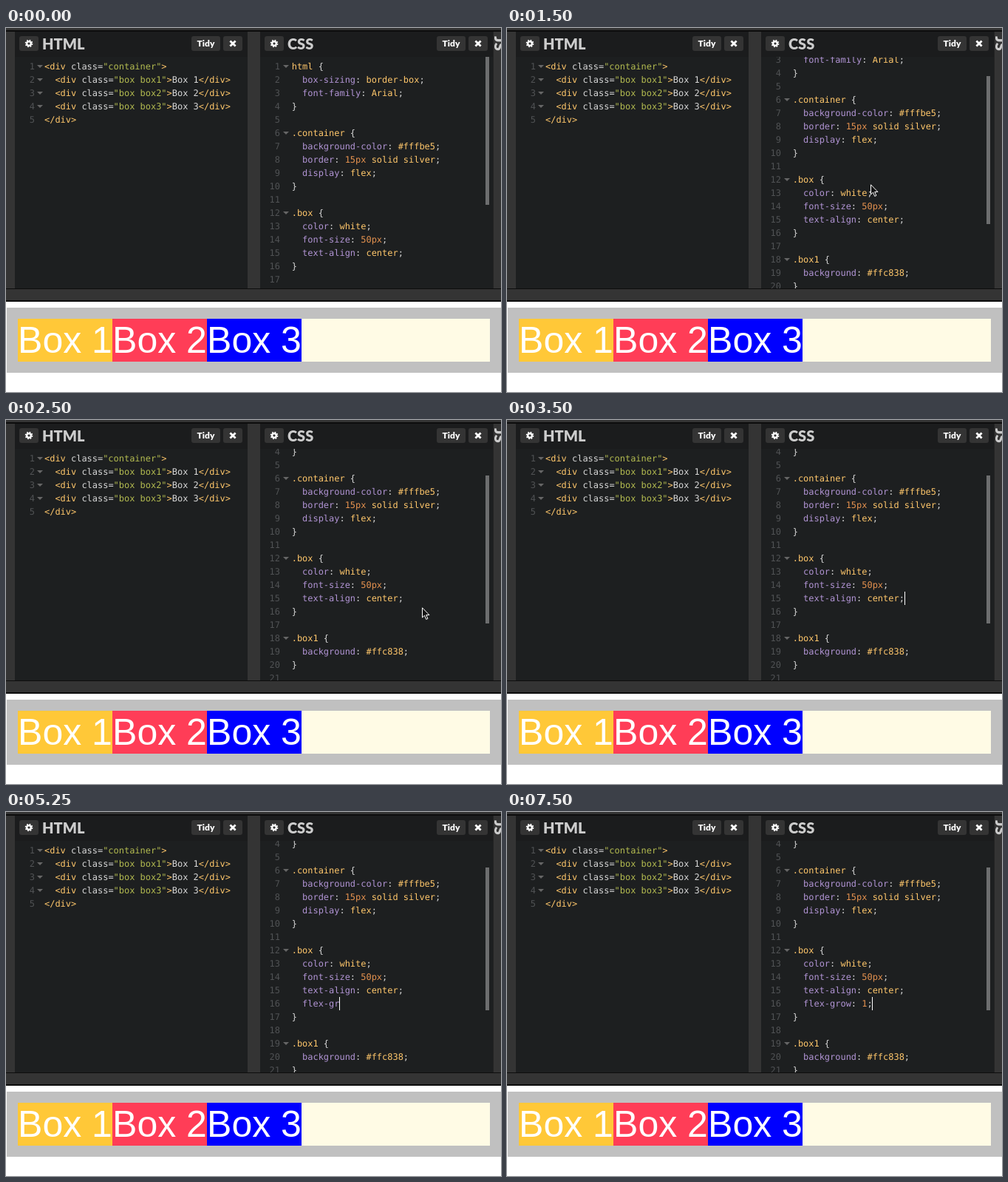
Animation of 670x492 px, one loop 8000 ms. Source, as an HTML page:

```html
<!DOCTYPE html>
<html lang="en">
<head>
<meta charset="utf-8">
<title>Flexbox editor</title>
<style>
  html, body { margin: 0; width: 100%; height: 100%; overflow: hidden; background: #fff; }
  #stage { position: relative; width: 670px; height: 492px; overflow: hidden; background: #fff; }
  #stage div, #stage svg { position: absolute; box-sizing: border-box; }
  #top { width: 670px; height: 370px; background: #343434; overflow: hidden; }
  #rule { top: 3px; width: 670px; height: 2px; background: #0d0d0d; }
  #sash { top: 352px; width: 670px; height: 18px; background: #343434;
    border-top: 1px solid #0d0d0d; border-bottom: 2px solid #0d0d0d; }
  .panel { top: 5px; width: 315px; height: 348px; background: #1d1f20; }
  .bar { width: 315px; height: 34px; background: #1b1c1d; }
  .btn { top: 6px; height: 20px; border-radius: 3px; background: #343434; color: #fff;
    font: 900 12px/20px Lato, sans-serif; text-align: center; }
  .btn svg { left: 50%; top: 50%; margin: -8px; width: 16px; height: 16px; fill: none; stroke: #fff; }
  .title { color: #ccc; font: 900 20px/24px Lato, sans-serif; white-space: pre; }
  .bar .title { left: 37px; top: 4px; }
  #next { left: 659px; top: 5px; width: 11px; height: 347px; border-left: 1px solid #222; overflow: hidden; }
  #next .title { left: 21px; top: 6px; transform-origin: 0 0; transform: rotate(90deg); }
  .view { top: 34px; width: 315px; height: 314px; overflow: hidden; }
  .lines { top: 4px; width: 315px; }
  .row { width: 315px; height: 18px; white-space: pre; color: #d8d8d8;
    font: 11.96px/18px "DejaVu Sans Mono", monospace; text-rendering: geometricPrecision; }
  .num { width: 27px; text-align: right; color: #505254; }
  .num.wide { left: 0; }
  .fold { top: 7px; border: 4px solid transparent; border-top-color: #666; border-bottom: 0; }
  .key { color: #ffc76b; }
  .prop { color: #b194d4; }
  .val { color: #e5924f; }
  .str { color: #b3bb50; }
  #thumb { left: 305px; width: 5px; background: #6d6e6f; }
  #caret { width: 1px; height: 18px; background: #fff; }
  #box { left: 1px; top: 378px; width: 669px; height: 88px; background: #fffbe5; border: 15px solid silver; }
  #box div { top: 0; width: 128px; height: 58px; color: #fff; text-align: center; white-space: pre;
    font: 50px/58px "Liberation Sans", Arial, sans-serif; }
  #mouse { width: 13px; height: 19px; overflow: visible; }
</style>
</head>
<body>
<div id="stage"></div>
<script>
const markup = `<div class="container">
  <div class="box box1">Box 1</div>
  <div class="box box2">Box 2</div>
  <div class="box box3">Box 3</div>
</div>`.split("\n");

const styles = `html {
  box-sizing: border-box;
  font-family: Arial;
}

.container {
  background-color: #fffbe5;
  border: 15px solid silver;
  display: flex;
}

.box {
  color: white;
  font-size: 50px;
  text-align: center;
}

.box1 {
  background: #ffc838;
}

.box2 {`.split("\n");

const GAP = 15;      // index of the line being typed
const PITCH = 7.2;   // width of one character
const LOOP = 8000;

// time, scroll, mouse position or null, typed text or null, caret shown
const steps = [
  [0, 0, null, null, false],
  [500, 0, [519, 209], null, false],
  [750, 0, [492, 211], null, false],
  [1000, 9, [492, 211], null, false],
  [1250, 28, [492, 211], null, false],
  [1500, 45, [492, 211], null, false],
  [1750, 57, [492, 211], null, false],
  [2000, 64, [563, 253], null, false],
  [2500, 63, [563, 253], null, false],
  [2750, 63, [559, 253], null, false],
  [3000, 63, [551, 249], null, false],
  [3250, 63, [551, 249], null, true],
  [3500, 63, null, null, true],
  [3750, 63, null, null, false],
  [4000, 63, null, "", true],
  [4500, 63, null, "fl", true],
  [4750, 63, null, "flex", true],
  [5000, 63, null, "flex-g", true],
  [5250, 63, null, "flex-gr", true],
  [5750, 63, null, "flex-grow", true],
  [6250, 63, null, "flex-grow:", true],
  [6500, 63, null, "flex-grow: ", true],
  [6750, 63, null, "flex-grow: 1", true],
  [7250, 63, null, "flex-grow: 1;", true]
];

const stage = document.getElementById("stage");

function add(parent, props = {}, style = {}) {
  const el = document.createElement("div");
  Object.assign(el, props);
  for (const k in style) el.style[k] = typeof style[k] === "number" ? style[k] + "px" : style[k];
  return parent.appendChild(el);
}

const gear = `<svg viewBox="-8 -8 16 16"><circle r="2.8" stroke-width="2.4"/>
  <circle r="4.4" stroke-width="1.9" stroke-dasharray="1.728"/></svg>`;
const cross = `<svg viewBox="-8 -8 16 16"><path d="M-3.6-3.6 3.6 3.6M3.6-3.6-3.6 3.6" stroke-width="2.8"/></svg>`;

const cssLang = {
  token: /(^ +[\w-]+|#\w+|\d+\w*|[.\w-]+)/,
  kind: s => s[0] === " " ? "prop" : /^\d/.test(s) ? "val" : "key",
  folds: /\{$/, codeLeft: 42.7, foldLeft: 31
};
const htmlLang = {
  token: /(<\/?\w+|>|"[^"]*")/,
  kind: s => s[0] === '"' ? "str" : "key",
  folds: /<div/, codeLeft: 40, foldLeft: 30
};

function drawLines(list, lines, lang) {
  list.textContent = "";
  lines.forEach((line, i) => {
    const row = add(list, { className: "row" }, { top: i * 18 });
    add(row, { className: "num", textContent: i + 1 });
    if (lang.folds.test(line)) add(row, { className: "fold" }, { left: lang.foldLeft });
    const code = add(row, {}, { left: lang.codeLeft });
    line.split(lang.token).forEach((part, n) => {
      const span = document.createElement("span");
      span.textContent = part;
      if (n % 2) span.className = lang.kind(part);
      code.appendChild(span);
    });
  });
}

function makePanel(left, name) {
  const panel = add(top_, { className: "panel" }, { left });
  const view = add(panel, { className: "view" });
  const bar = add(panel, { className: "bar" });
  add(bar, { className: "btn", innerHTML: gear }, { left: 6, width: 26 });
  add(bar, { className: "title", textContent: name });
  add(bar, { className: "btn", textContent: "Tidy" }, { left: 239, width: 39 });
  add(bar, { className: "btn", innerHTML: cross }, { left: 282, width: 26 });
  return { view, list: add(view, { className: "lines" }) };
}

const top_ = add(stage, { id: "top" });
add(top_, { id: "rule" });
const htmlPane = makePanel(12, "HTML");
const cssPane = makePanel(344, "CSS");
add(add(top_, { id: "next" }), { className: "title", textContent: "JS" });
add(top_, { id: "sash" });
const thumb = add(cssPane.view, { id: "thumb" });
const caret = add(cssPane.view, { id: "caret" });

const box = add(stage, { id: "box" });
["#ffc838", "#ff3d57", "#0000ff"].forEach((background, i) =>
  add(box, { textContent: "Box " + (i + 1) }, { left: i * 128, background }));

stage.insertAdjacentHTML("beforeend", `<svg id="mouse"><path
  d="M.5.8V14l3-2.8 2.2 5.2 2.2-.9-2.2-5h4.2z" fill="#111" stroke="#fff"/></svg>`);
const mouse = document.getElementById("mouse");

drawLines(htmlPane.list, markup, htmlLang);

function show([, scroll, pos, typed, blink]) {
  const lines = styles.slice();
  const typing = typed !== null;
  if (typing) lines.splice(GAP, 0, "  " + typed);
  drawLines(cssPane.list, lines, cssLang);
  cssPane.list.style.top = 4 - scroll + "px";

  thumb.style.top = Math.round(Math.min(scroll, 63) * 0.57) + "px";
  thumb.style.height = (typing ? 193 : 200) + "px";

  const row = typing ? GAP : GAP - 1;
  caret.style.display = blink ? "" : "none";
  caret.style.left = Math.floor(cssLang.codeLeft + lines[row].length * PITCH + 0.2) + "px";
  caret.style.top = 4 + row * 18 - scroll + "px";

  mouse.style.display = pos ? "" : "none";
  if (pos) {
    mouse.style.left = pos[0] + "px";
    mouse.style.top = pos[1] + "px";
  }
}

let current = -1;
const start = performance.now();
function tick() {
  const t = (performance.now() - start) % LOOP;
  let i = steps.length - 1;
  while (steps[i][0] > t) i--;
  if (i !== current) show(steps[current = i]);
  requestAnimationFrame(tick);
}
tick();
</script>
</body>
</html>
```
